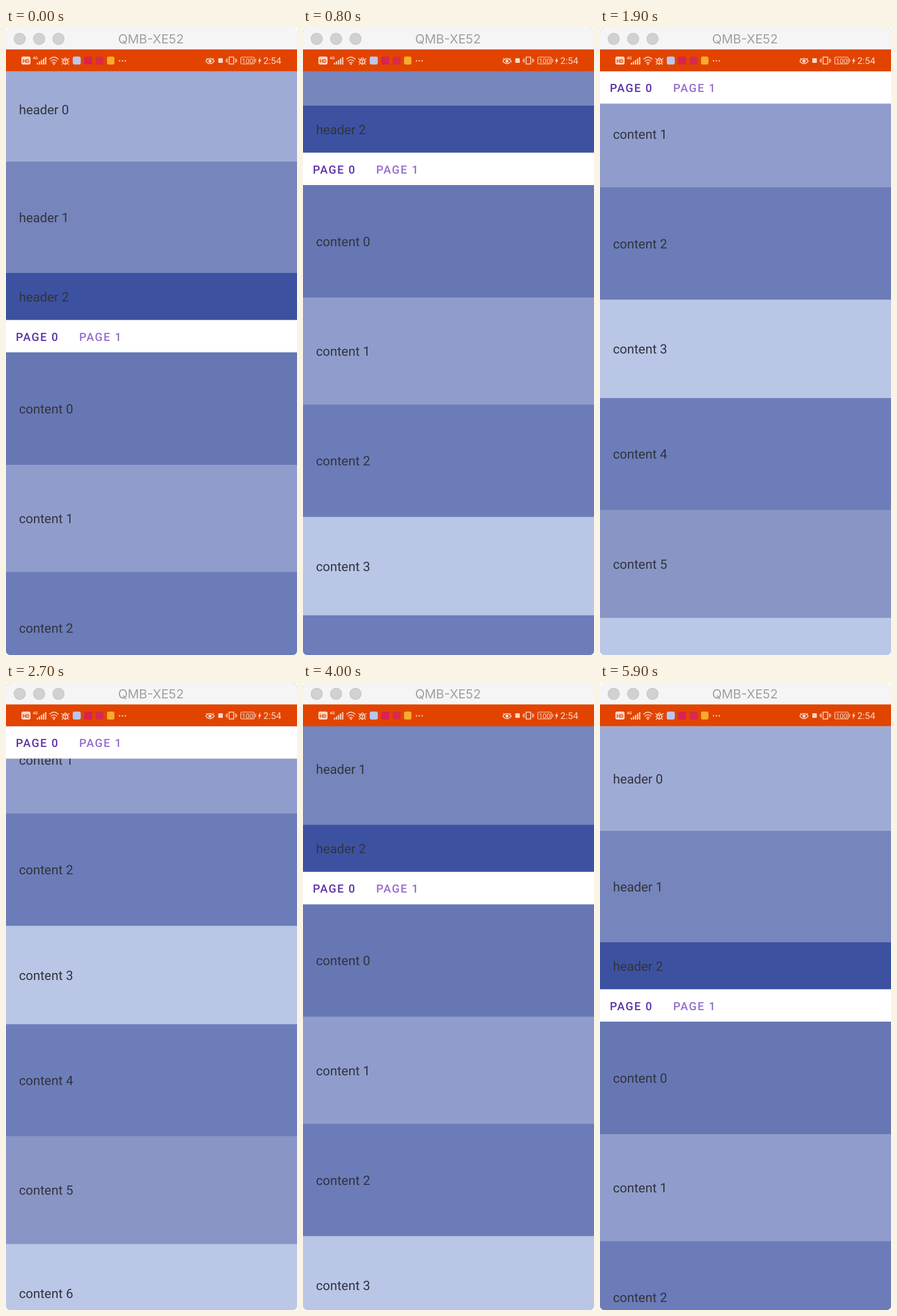
Write an HTML page with a canvas that moves like this. It is 510 px wide and 1098 px high and loops after 6000 ms.

```html
<!DOCTYPE html>
<html lang="en">
<head>
<meta charset="utf-8">
<title>Sticky tabs</title>
<style>
html, body { margin: 0; width: 100%; height: 100%; overflow: hidden; background: #fff; }
canvas { display: block; }
</style>
</head>
<body>
<canvas id="stage" width="510" height="1098"></canvas>
<script>
const ctx = document.getElementById('stage').getContext('2d');
const LOOP = 6000, STEP = 100;
const BAR_TOP = 37.5, BAR_BOTTOM = 75.7, TAB_TOP = 536.3, TAB_HEIGHT = 56.7;
const ROBOTO = 'Roboto, sans-serif';
const PALE = '#fbd9c8', ORANGE = '#e24400';

// [height, colour]
const headers = [[183.3, '#9eabd5'], [195, '#7685bb'], [82.3, '#3c52a1']];
const contents = [
  [197, '#6777b4'], [187.5, '#909dcc'], [196.7, '#6c7cb8'], [172.3, '#b9c6e5'],
  [196, '#6d7db9'], [189, '#8996c5'], [173, '#bac7e6']
];

// [time, scroll offset]
const scrollKeys = [
  [0, 25], [800, 318], [1900, 698.5], [2700, 749],
  [3600, 485.6], [4300, 58.3], [5600, 0], [6000, 0]
];
const slopes = scrollKeys.slice(1).map(([t, v], i) =>
  (v - scrollKeys[i][1]) / (t - scrollKeys[i][0]));
const tangents = scrollKeys.map((_, i) => {
  const a = slopes[i - 1], b = slopes[i];
  if (a === undefined) return b;
  if (b === undefined) return a;
  return a * b > 0 ? 2 * a * b / (a + b) : 0;
});

// Monotone cubic interpolation, so the list never overshoots a key.
function scrollAt(t) {
  let i = 0;
  while (i < scrollKeys.length - 2 && t >= scrollKeys[i + 1][0]) i++;
  const [t0, v0] = scrollKeys[i], [t1, v1] = scrollKeys[i + 1];
  const d = t1 - t0, u = (t - t0) / d, w = 1 - u;
  return v0 * (1 + 2 * u) * w * w + v1 * u * u * (3 - 2 * u)
    + d * u * w * (tangents[i] * w - tangents[i + 1] * u);
}

function rect(x, y, w, h, color) {
  ctx.fillStyle = color;
  ctx.fillRect(x, y, w, h);
}

function round(x, y, w, h, r, color) {
  ctx.fillStyle = color;
  ctx.beginPath();
  ctx.roundRect(x, y, w, h, r);
  ctx.fill();
}

function disc(x, y, r, color) {
  ctx.fillStyle = color;
  ctx.beginPath();
  ctx.arc(x, y, r, 0, Math.PI * 2);
  ctx.fill();
}

function line(path, width = 1.5) {
  ctx.strokeStyle = PALE;
  ctx.lineWidth = width;
  ctx.stroke(new Path2D(path));
}

function text(str, x, y, font, color, spacing = 0, align = 'left') {
  ctx.font = font;
  ctx.fillStyle = color;
  ctx.letterSpacing = spacing + 'px';
  ctx.textAlign = align;
  ctx.textRendering = 'geometricPrecision';
  ctx.fillText(str, x, y);
}

function drawList(items, label, y) {
  items.forEach(([height, color], i) => {
    rect(0, y, 510, height + 1, color);
    text(`${label} ${i}`, 22.67, y + height / 2 + 8.4, '22.67px ' + ROBOTO, '#32333f');
    y += height;
  });
}

function drawTabs(y) {
  rect(0, y, 510, TAB_HEIGHT, '#fff');
  const font = '500 19.83px ' + ROBOTO;
  text('PAGE 0', 17.3, y + 36.2, font, '#5b32a6', 1.77);
  text('PAGE 1', 128.2, y + 36.2, font, '#966dcd', 1.77);
}

function drawTitleBar() {
  rect(0, 0, 510, BAR_TOP, '#f5f5f5');
  for (const x of [24, 58, 92]) {
    disc(x, 19, 10.5, '#c3c3c3');
    disc(x, 19, 9.5, '#d1d1d1');
  }
  text('QMB-XE52', 254, 27, '22px Inter, sans-serif', '#a0a0a0', 0, 'center');
}

function drawLeftIcons() {
  round(27, 50, 16, 14, 3, PALE);
  text('HD', 35, 60.5, 'bold 9px ' + ROBOTO, ORANGE, 0, 'center');
  text('4G', 47, 55, 'bold 7px ' + ROBOTO, PALE);
  for (let i = 0; i < 5; i++) rect(54 + i * 3.6, 61 - i * 2.5, 2.2, 3 + i * 2.5, PALE);

  line('M76 55Q84 47 92 55M78.5 58.5Q84 53 89.5 58.5M81 61.5Q84 58.5 87 61.5');
  disc(84, 63, 1.5, PALE);

  // bug
  line('M100 56H108V60Q104 67 100 60ZM101 55Q104 50 107 55M104 56V63');
  line('M97 53L100 56M111 53L108 56M97 59H100M108 59H111M98 64L101 61M110 64L107 61', 1.2);

  round(117, 50, 14, 14, 3, '#b9c6ee');
  round(137, 50, 14, 14, 3, '#d92350');
  round(157, 50, 14, 14, 3, '#d82b48');
  round(177, 50, 13, 14, 3, '#f6ac2d');
  for (const x of [199, 204, 209]) disc(x, 57.5, 1.2, PALE);
}

function drawRightIcons() {
  // eye
  line('M350 58Q357.5 49 365 58Q357.5 67 350 58M351 53L353 55M364 53L362 55');
  disc(357.5, 58, 2.8, PALE);

  round(372, 53, 8, 8, 1, PALE);

  // vibrating phone
  line('M391 51H399V63H391ZM387.5 53V61M402.5 53V61');
  line('M385.5 55V59M404.5 55V59', 1);

  // battery
  line('M413 51H433Q435 51 435 53V61Q435 63 433 63H413Q411.5 63 411.5 61V53Q411.5 51 413 51M437.5 54V60', 1.2);
  text('100', 423.3, 61.5, '12px ' + ROBOTO, PALE, 0, 'center');
  ctx.fillStyle = PALE;
  ctx.fill(new Path2D('M446 51L441.5 58H444L442.5 64L447.5 56H445Z'));

  text('2:54', 451, 63, '16.3px ' + ROBOTO, PALE);
}

function draw(scroll) {
  ctx.clearRect(0, 0, 510, 1098);
  ctx.save();
  ctx.beginPath();
  ctx.roundRect(0, 0, 510, 1098, [8, 8, 7, 7]);
  ctx.clip();
  drawList(headers, 'header', BAR_BOTTOM - scroll);
  drawList(contents, 'content', TAB_TOP + TAB_HEIGHT - scroll);
  drawTabs(Math.max(BAR_BOTTOM, TAB_TOP - scroll));
  rect(0, 37, 510, BAR_BOTTOM - 37, ORANGE);
  drawTitleBar();
  drawLeftIcons();
  drawRightIcons();
  ctx.restore();
}

const start = performance.now();
function frame() {
  const t = (performance.now() - start) % LOOP;
  draw(scrollAt(Math.floor(t / STEP) * STEP));
  requestAnimationFrame(frame);
}
frame();
</script>
</body>
</html>
```
